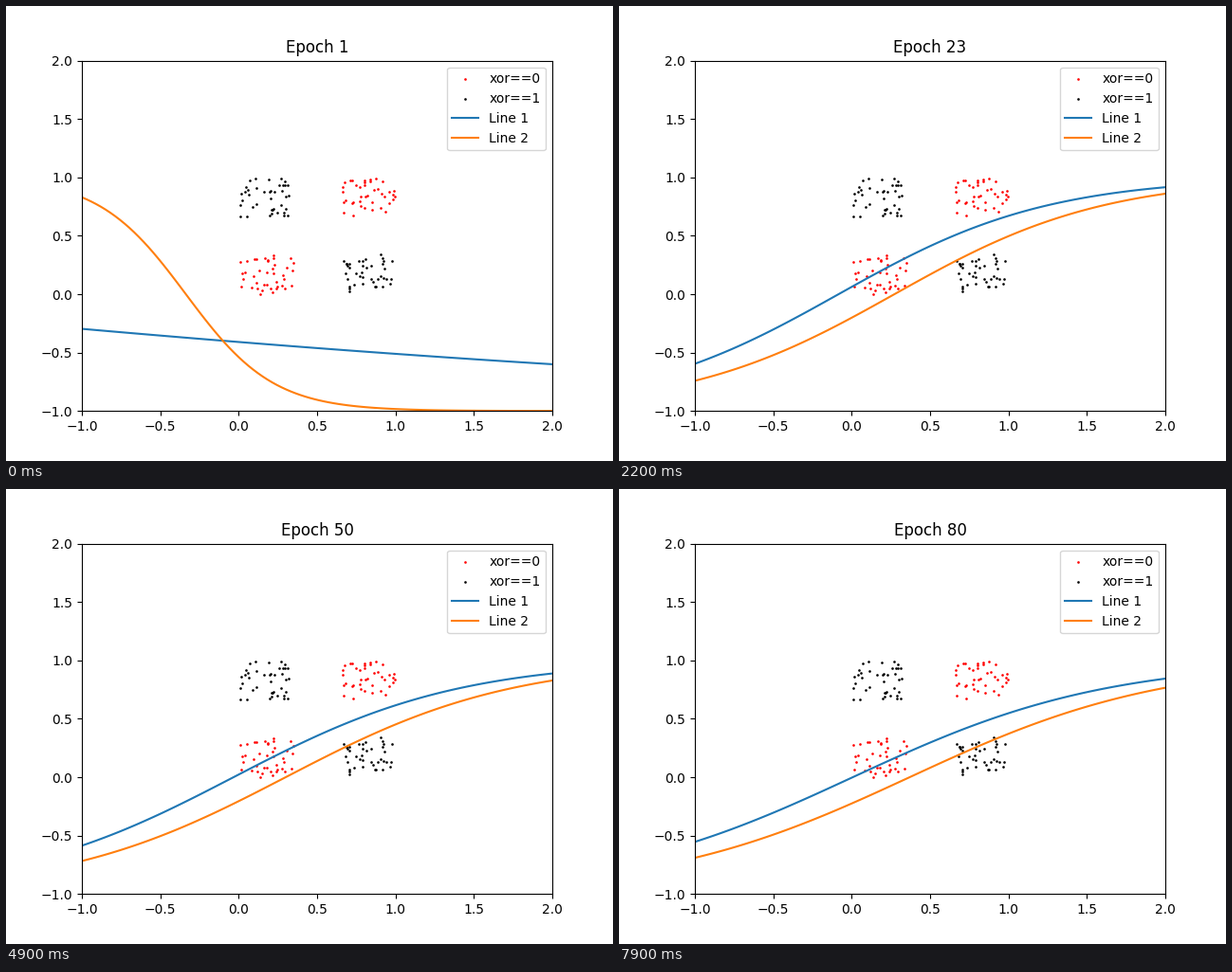
Write a matplotlib script that moves like this. It is 640x480 px and loops after 8 s.

```python
import numpy as np
import matplotlib.pyplot as plt
from matplotlib.animation import FuncAnimation

FRAMES = 80
SIDE = .34        # edge of each square of samples
FAR = .66         # offset of the far squares
COUNT = 40        # samples per square

plt.rcParams["font.family"] = "DejaVu Sans"
rng = np.random.default_rng(7)


def square(x, y):
    return rng.uniform((x, y), (x + SIDE, y + SIDE), (COUNT, 2))


def scatter(ax, corners, color, label):
    dots = np.vstack([square(x, y) for x, y in corners])
    ax.scatter(*dots.T, s=3.6, linewidths=0, c=color, label=label)


class Neuron:
    """Output tanh(w x + b), quickly leaving its start and then drifting."""

    def __init__(self, weight, bias, base, drift, swing):
        self.start = np.array([weight, bias])
        self.base, self.drift, self.swing = base, drift, swing

    def params(self, t):
        weight = .785 - .00143 * t - 8.4e-6 * t ** 2
        bias = self.base - self.drift * t + self.swing * np.exp(-t / 6)
        trained = np.array([weight, bias])
        return trained + (self.start - trained) * .45 ** t

    def output(self, x, t):
        w, b = self.params(t)
        return np.tanh(w * x + b)


neurons = [Neuron(-.129, -.435, base=.0665, drift=.0009, swing=.62),
           Neuron(-1.79, -.603, base=-.174, drift=.0007, swing=-.59)]

fig, ax = plt.subplots(figsize=(6.4, 4.8), dpi=100)
xs = np.linspace(-1, 2, 100)

scatter(ax, [(0.01, 0), (FAR, FAR)], "red", "xor==0")
scatter(ax, [(0, FAR), (FAR, 0)], "black", "xor==1")
lines = [ax.plot(xs, n.output(xs, 0), label=f"Line {i}")[0]
         for i, n in enumerate(neurons, 1)]

ticks = np.arange(-1, 2.1, .5)
ax.set(xlim=(-1, 2), ylim=(-1, 2), xticks=ticks, yticks=ticks)
ax.legend(loc="upper right")
title = ax.set_title("Epoch 1")


def update(t):
    title.set_text(f"Epoch {t + 1}")
    for line, neuron in zip(lines, neurons):
        line.set_ydata(neuron.output(xs, t))
    return [title, *lines]


anim = FuncAnimation(fig, update, frames=FRAMES, interval=100, repeat=True, repeat_delay=0)
plt.show()
```
